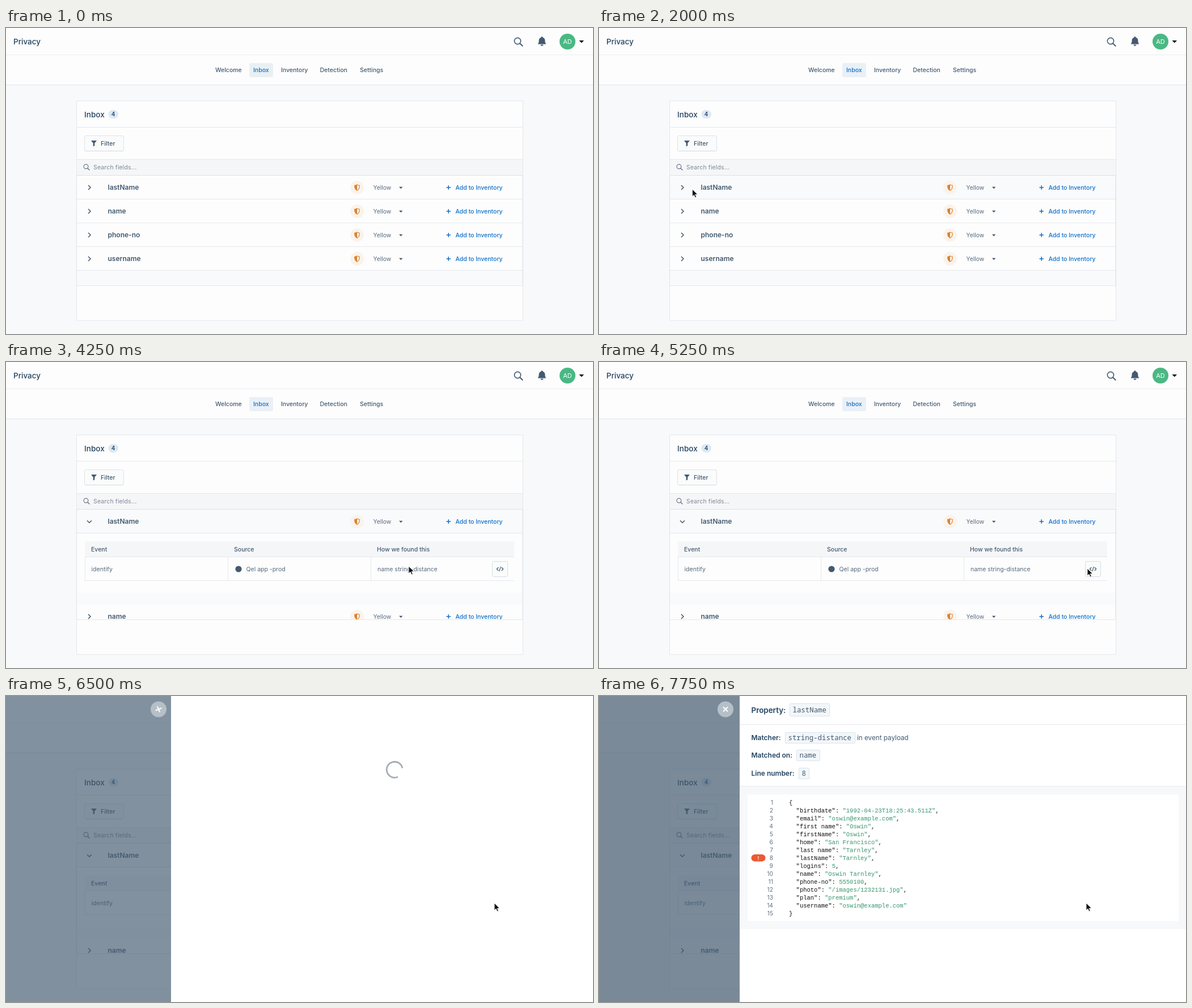
Write an HTML page that moves like this. It is 1035 px wide and 541 px high and loops after 8 s.

```html
<!DOCTYPE html>
<html lang="en">
<head>
<meta charset="utf-8">
<title>Privacy inbox</title>
<style>
html, body { margin: 0; width: 100%; height: 100%; overflow: hidden; background: #f8f9fa; }
svg { display: block; width: 1035px; height: 541px; font-family: Inter, "Open Sans", sans-serif; }
text { white-space: pre; }
.chip { font-family: "Noto Sans Mono", "DejaVu Sans Mono", monospace; }
.code { font-family: "Liberation Mono", monospace; }
</style>
</head>
<body>
<svg id="stage" viewBox="0 0 1035 541"></svg>
<script>
const LOOP = 8000;
const INK = '#234361', SLATE = '#425a70', MUTED = '#586a7e', BLUE = '#1070ca', LINE = '#e4e8ed';

// Drawing helpers: text is placed by the middle of its capitals.
const text = (x, y, s, size = 10.5, weight = 400, fill = SLATE, more = '') =>
  `<text x="${x}" y="${y + size * 0.36}" font-size="${size}" font-weight="${weight}" fill="${fill}" ${more}>${s}</text>`;
const box = (x, y, w, h, fill, more = '') =>
  `<rect x="${x}" y="${y}" width="${w}" height="${h}" fill="${fill}" ${more}/>`;
const path = (d, stroke, width = 1.5, more = '') =>
  `<path d="${d}" fill="none" stroke="${stroke}" stroke-width="${width}" ${more}/>`;
const shape = (d, fill, more = '') => `<path d="${d}" fill="${fill}" ${more}/>`;
const disc = (x, y, r, fill) => `<circle cx="${x}" cy="${y}" r="${r}" fill="${fill}"/>`;
const hline = (x1, x2, y, color = LINE) => path(`M${x1} ${y}H${x2}`, color, 1);
const vline = (x, y1, y2, color = LINE) => path(`M${x} ${y1}V${y2}`, color, 1);
const group = (id, body, more = '') => `<g id="${id}" ${more}>${body}</g>`;
const lens = (x, y, r, color, width) =>
  `<circle cx="${x}" cy="${y}" r="${r}" fill="none" stroke="${color}" stroke-width="${width}"/>` +
  path(`M${x + r * 0.75} ${y + r * 0.75}l${r * 0.8} ${r * 0.8}`, color, width * 1.25, 'stroke-linecap="round"');

function header() {
  const tabs = [['Welcome', 369], ['Inbox', 436], ['Inventory', 485], ['Detection', 553.5], ['Settings', 624]];
  return box(0, 0, 1035, 101, '#fdfdfd') + hline(0, 1035, 47.5, '#e9ecef') + hline(0, 1035, 100.5, '#e1e5e9') +
    group('title', text(13, 24, 'Privacy', 13.5, 500, INK)) +
    lens(902, 23, 5.6, SLATE, 1.6) +
    shape('M945 15.2c1.2 0 1.8 .7 1.8 1.8 2.6 .8 3.6 2.8 3.6 5.2 0 3.6 .7 4.600 2 6.300H937.600c1.300-1.700 2-2.700 2-6.300 0-2.400 1-4.400 3.600-5.200 0-1.100 .6-1.800 1.800-1.800zM942.500 29.500h5a2.500 2.300 0 0 1-5 0z', SLATE) +
    disc(990, 24, 14, '#4ab883') + text(990, 24, 'AD', 11, 400, '#fff', 'text-anchor="middle"') +
    shape('M1010.500 22h8.500l-4.250 4.500z', '#111') +
    box(429, 62, 42, 25, '#e9f0f3', 'id="tab" rx="3"') +
    tabs.map(([s, x]) => text(x, 74.500, s, 10.5, 500, s === 'Inbox' ? BLUE : SLATE)).join('');
}

function row(name, y, open) {
  const chevron = open ? `M143 ${y - 1.8}l4 4 4-4` : `M145 ${y - 4}l4 4-4 4`;
  return path(chevron, SLATE, 1.5) +
    text(179.5, y, name, 12, 600, SLATE) +
    disc(619, y, 12, '#faf3ec') +
    path(`M619 ${y - 5}q2 1.300 4.200 1.300v2.200q0 4.200-4.200 6.800-4.200-2.600-4.200-6.800v-2.200q2.200 0 4.200-1.300z`, '#d9822b', 1.1) +
    shape(`M619 ${y - 5}v10.300q-4.200-2.600-4.200-6.800v-2.200q2.200 0 4.200-1.300z`, '#d9822b') +
    text(647.5, y, 'Yellow', 10.3, 400, MUTED) +
    shape(`M693 ${y - 1.300}h6.400l-3.200 3.600z`, SLATE) +
    path(`M776.500 ${y}h7.500M780.250 ${y - 3.750}v7.500`, BLUE, 1.5) +
    text(792.5, y, 'Add to Inventory', 10.5, 500, BLUE);
}

function closedRows() {
  const names = ['lastName', 'name', 'phone-no', 'username'];
  return box(125, 261, 786, 168, '#fdfdfd') +
    box(125, 261, 786, 41, '#f8fafc', 'id="hover"') +
    names.map((s, i) => row(s, 282 + 42 * i) + hline(125, 911, 302.5 + 42 * i)).join('');
}

function openRow() {
  return box(125, 261, 786, 41, '#f9fafc') + row('lastName', 282, true) + hline(125, 911, 302.5) +
    box(125, 303, 786, 105, '#fdfdfd') +
    box(139, 317, 757, 28, '#f5f6f8') + hline(139, 896, 344.5) + hline(139, 896, 386.5) +
    [139.5, 391.5, 643.5].map(x => vline(x, 345, 387)).join('') +
    text(150, 331, 'Event', 10.5, 500) + text(402, 331, 'Source', 10.5, 500) +
    text(654, 331, 'How we found this', 10.5, 500) +
    text(150.5, 366, 'identify', 10.6, 400, MUTED) +
    disc(410, 366, 5.6, SLATE) + text(423.5, 366, 'Qel app -prod', 10.5, 400, MUTED) +
    text(655, 366, 'name string-distance', 10.5, 400, MUTED) +
    box(855.5, 350.5, 31, 31, '#d3deea', 'id="ring" rx="4"') +
    box(857.5, 352.5, 27, 27, '#fafbfb', 'id="button" rx="2.500" stroke="#d8dde3"') +
    path('M868.300 363l-3 3 3 3M873.700 363l3 3-3 3M872.200 361.800l-2.400 8.400', SLATE, 1.2) +
    box(125, 429, 786, 27, '#fdfdfd') + row('name', 450);
}

function panel() {
  return box(124.5, 129, 787, 388, '#fdfdfd', `id="panel" stroke="${LINE}"`) +
    text(138, 153, 'Inbox', 13.6, 500, INK) +
    box(180.5, 145, 17.500, 15, '#dce8f4', 'rx="7.500"') + text(189.2, 152.5, '4', 10, 600, '#264a6e', 'text-anchor="middle"') +
    hline(125, 911, 175.5) +
    box(138.5, 190.5, 69, 27, '#fafbfb', 'rx="2.500" stroke="#dfe3e8"') + hline(140, 206, 217.5, '#d3d8de') +
    shape('M150 199h10l-3.700 4.500v4.500l-2.600 1.500v-6z', SLATE) +
    text(167, 204, 'Filter', 10.6, 500, SLATE) +
    box(125, 233, 786, 27, '#f5f6f7') + hline(125, 911, 232.5) +
    lens(141, 245, 3.9, '#66788a', 1.2) +
    text(154, 246, 'Search fields...', 10.5, 400, '#7b8a99', 'letter-spacing=".15"') +
    box(125, 428, 786, 27, '#f9fafb') +
    group('closed', closedRows()) +
    group('open', box(125, 408, 786, 21, '#f9fafb') + openRow(), 'clip-path="url(#list)"') +
    path('M124.500 455.500V260.500H911V455.500', '#dce1e7', 1) + hline(125, 911, 455.5);
}

const closeButton = (x, turn) =>
  disc(x, 23.500, 14, '#b5bfc8') +
  path(`M${x - 4} 19.500l8 8m0-8l-8 8`, '#fff', 2, `transform="rotate(${turn} ${x} 23.500)"`);

function loading() {
  return box(291, 0, 744, 541, '#fff') + closeButton(269, 22) +
    path('M698.900 127.500A14 14 0 1 0 691 143', '#a3aeb9', 2.8);
}

function payload() {
  const first = 'Oswin', last = 'Tarnley', mail = 'oswin@example.com';
  const data = {
    birthdate: '1992-04-23T18:25:43.511Z', email: mail, 'first name': first, firstName: first,
    home: 'San Francisco', 'last name': last, lastName: last, logins: 5, name: `${first} ${last}`,
    'phone-no': 5550100, photo: '/images/1232131.jpg', plan: 'premium', username: mail
  };
  const entries = Object.entries(data);
  const lines = entries.map(([key, value], i) =>
    `  "${key}": <tspan fill="#36966f">${JSON.stringify(value)}</tspan>${i < entries.length - 1 ? ',' : ''}`);
  return ['{', ...lines, '}'].map((s, i) => {
    const y = 188.300 + 14 * i;
    return text(307, y, i + 1, 10.300, 400, '#66727e', 'text-anchor="end"') +
      text(335, y, s, 10.5, 400, '#111', 'class="code"');
  }).join('');
}

function details() {
  const chip = (x, y, w, h, s) => box(x + .5, y + .5, w - 1, h - 1, '#f3f7fa', 'rx="1.500" stroke="#d9e4ed"') +
    text(x + 5.5, y + h / 2, s, 12.4, 400, SLATE, 'class="chip"');
  const label = (y, s, size = 12) => text(268.5, y, s, size, 600, INK);
  return box(248, 0, 787, 541, '#fff') + closeButton(223, 0) +
    label(25, 'Property:', 13.4) + chip(336, 13, 71, 23, 'lastName') +
    hline(248, 1035, 50.5) +
    label(74, 'Matcher:') + chip(328, 64, 124, 20, 'string-distance') +
    text(455, 74, 'in event payload', 11.7, 400, SLATE) +
    label(105, 'Matched on:') + chip(348, 95, 42, 20, 'name') +
    label(137, 'Line number:') + chip(352, 127, 19, 20, '8') +
    box(248, 160, 787, 252, '#f7f8f9') + hline(248, 1035, 159.5, '#e9ecef') +
    box(262, 174, 760, 224, '#fff') +
    box(268.5, 280, 25, 12.5, '#ec5a34', 'rx="6.250"') +
    text(281, 286.300, '!', 9.5, 500, '#fff', 'text-anchor="middle"') +
    payload();
}

const stage = document.getElementById('stage');
stage.innerHTML =
  '<defs><clipPath id="list"><rect x="124" y="260" width="788" height="195.500"/></clipPath></defs>' +
  box(0, 0, 1035, 541, '#f8f9fa') + header() + panel() +
  box(0, 0, 1035, 541, '#435a6f', 'id="shade"') +
  group('loading', loading()) + group('details', details()) +
  group('cursor', shape('M0 0V13l3-2.800 2.100 4.700 2.200-1-2-4.500h4.200z', '#111', 'stroke="#fff" stroke-width=".9"'));

const part = id => document.getElementById(id);
const show = (id, on) => part(id).setAttribute('visibility', on ? 'visible' : 'hidden');
const set = (id, name, value) => part(id).setAttribute(name, value);

// Pointer stops: time, x, y
const stops = [
  [250, 682, 150], [500, 570, 190], [750, 465, 235], [1000, 322, 312], [1250, 196, 322],
  [1750, 175, 302], [2000, 164.5, 285], [3000, 169, 325], [3250, 176, 365], [3500, 184, 369],
  [3750, 355, 362], [4000, 574, 337], [4250, 710, 361], [4500, 815, 374], [4750, 860, 374],
  [5000, 864, 369], [5250, 861, 365], [6500, 861, 366], [7750, 859, 366]
];

function draw(t) {
  const at = stops.filter(s => s[0] <= t).pop();
  show('cursor', at);
  if (at) set('cursor', 'transform', `translate(${at[1]} ${at[2]})`);

  const opened = t >= 2250;
  show('hover', t >= 2000 && !opened);
  show('closed', !opened);
  show('open', opened);
  set('tab', 'fill', t < 250 ? '#e9f0f3' : '#eaf0f6');

  const pressed = t >= 5500;
  show('ring', t >= 5750);
  set('button', 'fill', pressed ? '#eceff3' : '#fafbfb');
  set('button', 'stroke', pressed ? '#b9c5d2' : '#d8dde3');

  show('title', t < 6000);
  set('panel', 'height', t >= 6000 && t < 6500 ? 420 : 388);
  show('shade', t >= 6500);
  set('shade', 'opacity', t < 6750 ? 0.66 : 0.7);
  show('loading', t >= 6500 && t < 6750);
  show('details', t >= 6750);
}

// Inherited visibility would leak out of hidden groups, so nested parts are drawn after their group.
function tick() {
  draw(performance.now() % LOOP);
  requestAnimationFrame(tick);
}
tick();
</script>
</body>
</html>
```
